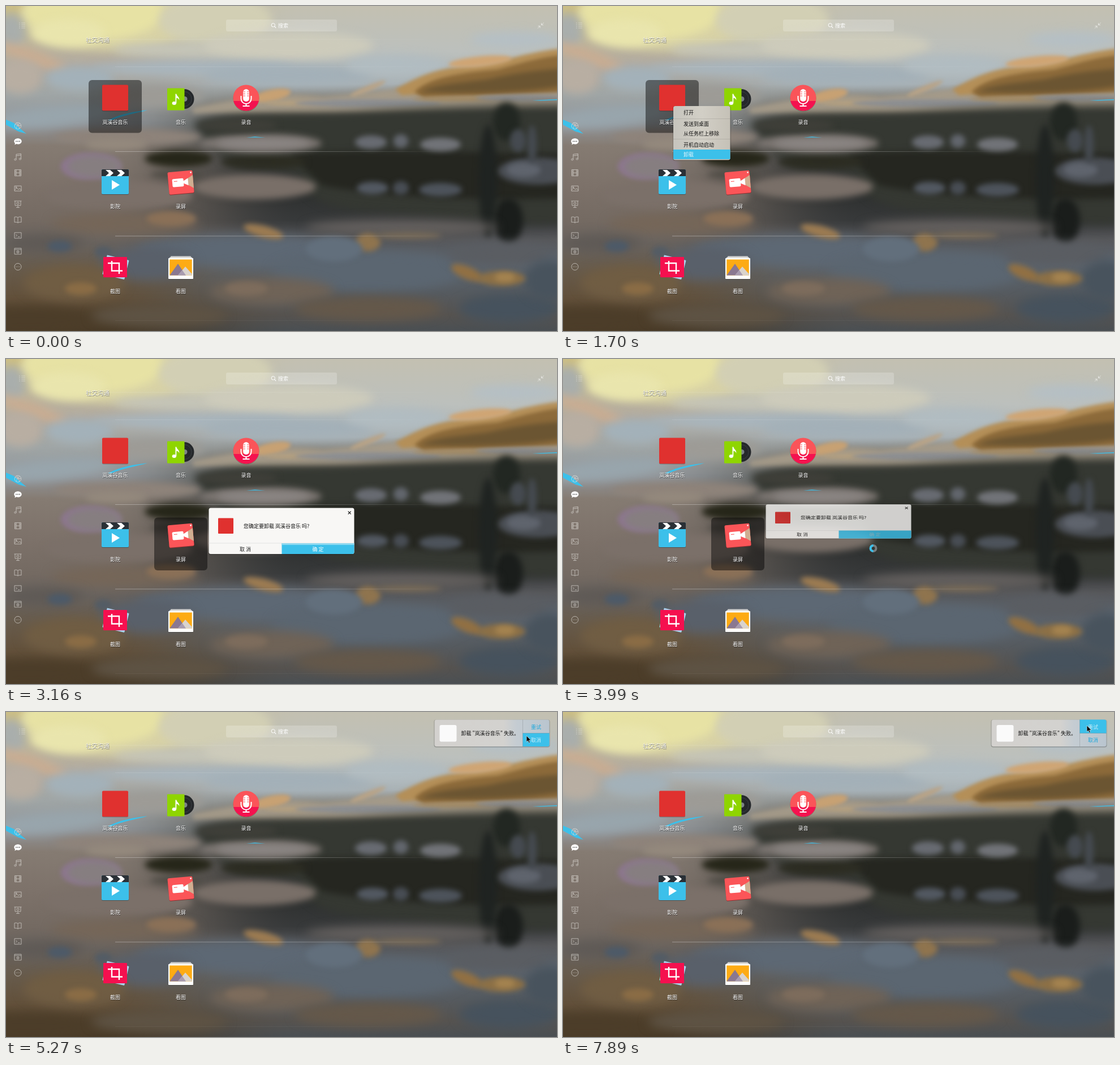
These frames come from a looping animation (974x575 px, 8000 ms). An HTML page with a canvas:

```html
<!DOCTYPE html>
<html lang="zh-CN">
<head>
<meta charset="utf-8">
<title>Launcher</title>
<style>
html, body { margin: 0; width: 100%; height: 100%; overflow: hidden; background: #555; }
#back, #ui { position: absolute; left: 0; top: 0; width: 974px; height: 575px; display: block; }
text { font: 9px "Noto Sans CJK SC", "Noto Sans CJK", "Noto Sans", sans-serif; white-space: pre; }
</style>
</head>
<body>
<canvas id="back" width="974" height="575"></canvas>
<svg id="ui" viewBox="0 0 974 575"></svg>
<script>
const W = 974, H = 575, LOOP = 8000;
const APP = '岚溪谷音乐', BLUE = '#3cc0ea', RED = '#e0312f';

/* ---------- wallpaper ---------- */
const ctx = document.getElementById('back').getContext('2d');

function column(stops) {
  const g = ctx.createLinearGradient(0, 0, 0, H);
  stops.forEach(([at, color]) => g.addColorStop(at, color));
  return g;
}

function blobs(blur, list) {
  ctx.filter = `blur(${blur}px)`;
  for (const [color, x, y, rx, ry, turn = 0] of list) {
    ctx.fillStyle = color;
    ctx.beginPath();
    ctx.ellipse(x, y, rx, ry, turn, 0, Math.PI * 2);
    ctx.fill();
  }
  ctx.filter = 'none';
}

function shape(blur, color, d) {
  ctx.filter = blur ? `blur(${blur}px)` : 'none';
  ctx.fillStyle = color;
  ctx.fill(new Path2D(d));
  ctx.filter = 'none';
}

function paintBack() {
  ctx.fillStyle = column([[0, '#cdbf84'], [.1, '#c0b89c'], [.18, '#b2aba0'], [.27, '#a0a6a6'],
    [.36, '#92969a'], [.43, '#857b72'], [.55, '#7d726a'], [.66, '#746a62'], [.73, '#69635e'],
    [.81, '#675b4c'], [.9, '#62503a'], [1, '#473926']]);
  ctx.fillRect(0, 0, W, H);
  ctx.fillStyle = column([[0, '#c3c0b1'], [.14, '#bcc0bd'], [.24, '#a9b2b6'], [.31, '#6c665c'],
    [.36, '#42443f'], [.43, '#3a3d3e'], [.55, '#2b2d2c'], [.66, '#37393a'], [.72, '#57585b'],
    [.79, '#5d6670'], [.88, '#565b60'], [.95, '#565350'], [1, '#4a4f53']]);
  for (let x = 150; x < W; x++) {
    const k = Math.min(1, (x - 150) / 380);
    ctx.globalAlpha = k * k * (3 - 2 * k);
    ctx.fillRect(x, 0, 1, H);
  }
  ctx.globalAlpha = 1;

  // sky
  blobs(8, [['#d9d3a6', 190, 20, 165, 58], ['#e7e2a4', 155, 10, 125, 50], ['#e9e5ad', 110, 48, 66, 24],
    ['#d2cfb4', 370, 25, 100, 46], ['#c5c5b8', 330, 78, 140, 13], ['#a9aeac', 8, 45, 26, 32],
    ['#c9ad92', 45, 90, 66, 13, .35], ['#b8aea2', 25, 125, 40, 30], ['#cdcbbb', 500, 70, 150, 26],
    ['#a8b5bd', 330, 110, 180, 13], ['#a3b1b9', 130, 128, 60, 22], ['#a3b0b8', 500, 122, 150, 18],
    ['#b1bcc1', 690, 105, 90, 18], ['#b5bfc4', 900, 60, 80, 14], ['#98a5ac', 75, 196, 110, 18, -.1],
    ['#9d9b96', 260, 158, 90, 20]]);

  // hills
  shape(4, '#a49a89', 'M330 180C420 162 480 150 560 160C620 156 680 146 740 140L990 130V190H330Z');
  shape(3, '#b48f58', 'M688 148C730 122 770 108 820 106C870 104 900 84 990 74V140L700 158Z');
  shape(3, '#8c6a3a', 'M722 152C750 124 810 118 870 112C920 98 950 90 990 86V152L740 164Z');
  shape(4, '#6b5532', 'M732 152C760 138 800 136 850 130C900 118 940 114 990 110V140C920 154 800 156 732 152Z');
  blobs(3, [['#cfa574', 838, 98, 56, 9, -.1], ['#c7a173', 470, 158, 34, 10, -.2], ['#b9a386', 640, 146, 34, 5, -.4],
    ['#b39f80', 520, 172, 60, 5], ['#8d8f92', 640, 172, 130, 7], ['#a58d68', 810, 164, 90, 5],
    ['#8b8b8b', 910, 163, 80, 6]]);

  // far shore and its reflection
  shape(8, '#353832', 'M330 206C400 184 520 196 640 186C760 178 860 176 990 174V384C900 394 760 372 620 362C560 356 520 330 520 300L470 286C400 300 370 262 330 206Z');
  shape(6, '#252620', 'M500 262C640 252 800 258 990 262V340C820 346 660 336 560 318Z');
  blobs(4, [['#8d7690', 150, 284, 53, 24]]);
  blobs(6, [['#867e80', 156, 284, 48, 20], ['#8e837a', 215, 232, 130, 14], ['#94897d', 195, 245, 55, 10],
    ['#262619', 305, 270, 60, 15], ['#2c2c22', 455, 276, 75, 13], ['#7b7571', 450, 243, 108, 17],
    ['#8b8684', 455, 243, 82, 8], ['#796f68', 440, 320, 108, 22], ['#3f3f39', 410, 211, 70, 11],
    ['#7b7069', 200, 335, 130, 26], ['#44423b', 300, 298, 46, 5], ['#222722', 885, 205, 24, 34],
    ['#1a1d1b', 888, 380, 26, 40], ['#1f2321', 852, 310, 16, 100]]);
  blobs(5, [['#4a4e54', 940, 292, 70, 24], ['#686b72', 645, 241, 28, 12], ['#62666d', 698, 239, 13, 12],
    ['#717378', 768, 245, 36, 12], ['#5f646d', 915, 290, 30, 13], ['#454a50', 905, 238, 14, 20],
    ['#525861', 648, 322, 28, 11], ['#484d54', 698, 322, 14, 12], ['#4d535b', 768, 325, 38, 12],
    ['#454a50', 930, 245, 8, 34]]);

  // near water
  blobs(9, [['#5d6874', 420, 432, 190, 28], ['#5b6671', 640, 470, 170, 36], ['#64605e', 700, 392, 170, 14],
    ['#59606a', 250, 455, 85, 30], ['#705d43', 120, 490, 90, 32], ['#4c3d29', 40, 556, 140, 24],
    ['#6f6357', 470, 505, 110, 24], ['#5e5344', 270, 548, 120, 18], ['#756658', 210, 385, 130, 18],
    ['#64584a', 640, 535, 130, 22], ['#46525d', 890, 535, 90, 26], ['#5a5d62', 870, 440, 90, 22],
    ['#48535d', 960, 485, 44, 36], ['#5f5a56', 70, 420, 70, 16]]);
  blobs(5, [['#9c7b51', 455, 399, 36, 10, .25], ['#8f744e', 640, 418, 22, 16], ['#776a58', 710, 406, 60, 6],
    ['#917043', 815, 472, 30, 11, .4], ['#8c7046', 876, 482, 42, 13], ['#a58450', 882, 480, 18, 8],
    ['#8a6c45', 132, 500, 28, 11], ['#8a7057', 292, 376, 44, 13], ['#7d6c5c', 425, 500, 38, 12],
    ['#626f7c', 580, 430, 50, 22], ['#4d5a68', 95, 425, 22, 10], ['#535c65', 172, 435, 16, 10]]);

  // bright glints
  shape(0, BLUE, 'M0 201L14 207L24 216L36 226L22 222L0 210Z');
  shape(0, BLUE, 'M180 202C205 190 225 187 250 184C232 190 205 193 185 203Z');
  shape(0, BLUE, 'M425 233L440 231L458 233L440 232.4ZM930 167L974 165V166.4L945 167.6Z');
}
paintBack();

/* ---------- svg helpers ---------- */
const text = (x, y, s, fill = '#fff', more = '') => `<text x="${x}" y="${y}" fill="${fill}" ${more}>${s}</text>`;
const mid = (x, y, s, fill, more = '') => text(x, y, s, fill, `text-anchor="middle" ${more}`);
const rect = (x, y, w, h, fill, r = 0, more = '') =>
  `<rect x="${x}" y="${y}" width="${w}" height="${h}" rx="${r}" fill="${fill}" ${more}/>`;
const path = (d, fill = 'none', more = '') => `<path d="${d}" fill="${fill}" ${more}/>`;
const circle = (x, y, r, fill = 'none', more = '') => `<circle cx="${x}" cy="${y}" r="${r}" fill="${fill}" ${more}/>`;
const group = (id, body, more = '') => `<g id="${id}" ${more}>${body}</g>`;
const line = (d, w = 2) => path(d, 'none', `stroke="#fff" stroke-width="${w}"`);
const label = (x, y, s) => mid(x + .5, y + 1, s, '#000', 'opacity=".6"') + mid(x, y, s);
const card = (id, x, y) => rect(x, y, 94, 93.5, '#000', 6, `id="${id}" fill-opacity=".46"`);

/* ---------- launcher ---------- */
const icons = {
  player: circle(315, 164.5, 17.5, '#25282b') + circle(315, 164.5, 13, 'none', 'stroke="#3b4044"') +
    circle(316, 164.5, 4.5, '#7d8486') + rect(285, 145.5, 30.5, 39, '#8fd500', 1) +
    `<ellipse cx="297.3" cy="172" rx="3.7" ry="3" fill="#fff"/>` +
    path('M299.5 172V155.5H301.3C302 160 307 160.5 306.3 167C305.5 164 303.5 163 301.3 162.5V172Z', '#fff'),
  recorder: circle(424.5, 163.4, 23, '#000', 'opacity=".25"') + circle(424.5, 162.5, 23, '#fa5459') +
    path('M402.2 168H446.8A23 23 0 0 1 402.2 168Z', '#f4124f') +
    rect(419.2, 147, 10.6, 22, '#fff', 5.3) + line('M415.5 159V164A9 9 0 0 0 433.5 164V159M424.5 173V177M418.5 177H430.5') +
    path('M419.5 152H423M426 152H429.5M419.5 155.5H423M426 155.5H429.5M419.5 159H423M426 159H429.5', 'none', 'stroke="#fa5459" stroke-width="1"'),
  cinema: rect(169, 290, 48, 44, '#000', 2, 'opacity=".3"') + rect(169, 289, 48, 44, BLUE, 2) +
    path('M169 301V291A2 2 0 0 1 171 289H215A2 2 0 0 1 217 291V301Z', '#2a3036') +
    [176, 196].map(x => path(`M${x} 290H${x + 8}L${x + 14} 295.5L${x + 8} 301H${x}L${x + 6} 295.5Z`, '#fff')).join('') +
    path('M187 308L201 316.5L187 325Z', '#fff'),
  capture: '<g transform="rotate(-5 309 312)">' + rect(287, 293.4, 44, 39.6, '#8c2f30', 2) + rect(287, 292.5, 44, 39.5, '#fb5558', 2) +
    path('M312 311L331 301V324Z', '#cfae91') + rect(294, 305, 20, 14.5, '#fff', 2) +
    path('M310 312L322 305.5V318.5Z', '#fff') + path('M297 309.5H303', 'none', 'stroke="#fb5558"') +
    circle(328, 296, 1.3, '#fff') + '</g>',
  shot: '<g transform="rotate(14 193 462)">' + rect(174, 444.5, 40, 35, '#a9d2ee', 1) + '</g>' +
    rect(172, 444, 42, 36, '#f5104f', 1) + line('M187 451V468.5H206M180 455H200V474', 2.4),
  viewer: rect(291, 442.5, 36, 4, '#ccc', 1) + rect(289, 444.5, 40, 4, '#e6e6e4', 1) +
    rect(287, 447, 44, 37, '#000', 1, 'opacity=".25"') + rect(287, 446, 44, 37, '#fbfbfa', 1) + rect(289.3, 448.5, 39.4, 28, '#fdab14') +
    path('M289.3 476.5L304 456L318 476.5Z', '#8a7891') + path('M304 476.5L317 461L328.7 474V476.5Z', '#d9d3cd') +
    path('M304 476.5L311.5 467.2L318 476.5Z', '#a89cb0')
};

const side = [
  circle(0, 0, 5.8) + path('M-5 -3C0 0 4 0 5.6 -1M-3 5C-1 -1 1 -4 4 -4.4M-2.5 -5.3C1 -2 2.5 2 2.6 5'),
  '',
  path('M-3 4V-5L5.5 -6V3M-3 -2.5L5.5 -3.5') + '<ellipse cx="-4.6" cy="4.2" rx="1.7" ry="1.4"/><ellipse cx="3.9" cy="3.2" rx="1.7" ry="1.4"/>',
  path('M-5.5 -5.5H5.5V5.5H-5.5ZM-3 -5.5V5.5M3 -5.5V5.5M-5.5 0H5.5M-5.5 -2.8H-3M-5.5 2.8H-3M3 -2.8H5.5M3 2.8H5.5'),
  path('M-6 -4.5H6V4.5H-6ZM-6 3L-2 -1L1 2L3 0L6 3') + circle(-3, -2, 1),
  path('M-6.5 -5.5H6.5M-5 -5.5V2.5H5V-5.5M0 2.5V6M-3 6H3') + circle(0, -1.5, 2),
  path('M0 -4C-2 -5.4 -4 -5.4 -6 -4.8V4.4C-4 4 -2 4 0 5.4C2 4 4 4 6 4.4V-4.8C4 -5.4 2 -5.4 0 -4V5.4'),
  path('M-6 -5H6V5H-6ZM-3.5 -2L-1.5 0L-3.5 2M0 2.5H3.5'),
  path('M-6 -5H6V5.5H-6ZM-6 -2.7H6') + circle(0, 1.4, 2.2) + circle(0, 1.4, .5),
  circle(0, 0, 6) + path('M-3.4 0H-2.2M-.6 0H.6M2.2 0H3.4')
].map((s, i) => `<g transform="translate(21 ${212 + i * 27.7})">${s}</g>`).join('');

const chat = path('M21 234.3C25 234.3 27.6 236.5 27.6 239.4C27.6 242.3 25 244.4 21 244.4C20 244.4 19.2 244.3 18.4 244L15.4 245.4L16 242.8C15 242 14.4 240.8 14.4 239.4C14.4 236.5 17 234.3 21 234.3Z', '#fff') +
  [18, 21, 24].map(x => circle(x, 239.4, .9, '#555')).join('');

const rules = [[59, 183, .12], [107.5, 193, .12], [257.5, 193, .3], [407, 193, .34], [556.5, 193, .05]]
  .map(([y, x, a]) => rect(x, y - .5, 780 - x, 1, 'url(#rule)', 0, `opacity="${a}"`)).join('');

const launcher = rules +
  path('M23 30H25M27 30H34M23 33H25M27 33H34M23 36H25M27 36H34M23 39H25M27 39H34', 'none', 'stroke="#fff" stroke-width="1" opacity=".3"') +
  rect(389, 24, 196, 21, '#fff', 3, 'fill-opacity=".2"') +
  circle(472.3, 33.8, 3.2, 'none', 'stroke="#fff"') + line('M474.7 36.2L477.2 38.8', 1.1) + text(481, 38.2, '搜索') +
  path('M946.5 30V33.5H950M950.5 29.5L946.5 33.5M944 39V35.5H940.5M940 39.5L944 35.5', 'none', 'stroke="#fff" stroke-width=".8" opacity=".7"') +
  text(141.5, 65, '社交沟通', '#555', 'style="font-size:10.5px" opacity=".75"') +
  text(141, 64, '社交沟通', '#fff', 'style="font-size:10.5px" opacity=".85"') +
  group('sidebar', side, 'stroke="#e4e2dd" stroke-width=".85" fill="none" opacity=".75"') + chat +
  card('hoverApp', 146, 131) + card('hoverCapture', 262, 280.5) +
  group('app', rect(170, 140.3, 46, 46, '#000', 2, 'opacity=".25"') + rect(170, 139.5, 46, 45.8, RED, 2) + label(193, 208.5, APP)) +
  Object.values(icons).join('') +
  label(309, 208.5, '音乐') + label(424.5, 208.5, '录音') + label(193, 358, '影院') +
  label(309, 358, '录屏') + label(193, 507.5, '截图') + label(309, 507.5, '看图');

/* ---------- menu, dialog, notice ---------- */
const items = [['打开', 188.5], ['发送到桌面', 209], ['从任务栏上移除', 226], ['开机自动启动', 246], ['卸载', 262.7]];
const menu = rect(194, 177, 103, 97, '#000', 4, 'opacity=".18"') + rect(195, 177, 100.5, 95.5, 'url(#menuFill)', 3.5) +
  rect(195, 199, 100.5, 1, '#000', 0, 'opacity=".1"') + rect(195, 235, 100.5, 1, '#000', 0, 'opacity=".1"') +
  rect(195, 0, 100.5, 17, BLUE, 0, 'id="pick"') +
  items.map(([s, y], i) => text(213, y + 3.3, s, '#111', `id="item${i}"`)).join('');

const dialog = rect(358, 264, 258, 82.5, '#000', 4, 'opacity=".2"') + rect(358.5, 263.5, 257, 81.5, '#f8f7f5', 3.5) +
  rect(375, 281.5, 27, 27.5, RED, 1) + text(420, 298.5, `您确定要卸载 ${APP} 吗?`, '#111') +
  path('M604.7 269.5L609.7 274.5M609.7 269.5L604.7 274.5', 'none', 'stroke="#222" stroke-width="1.1"') +
  rect(358.5, 325.5, 257, .8, '#ddd') +
  path('M358.5 326H487.5V345H362A3.5 3.5 0 0 1 358.5 341.5Z', BLUE, 'id="noFill"') +
  path('M487.5 326H615.5V341.5A3.5 3.5 0 0 1 612 345H487.5Z', BLUE, 'id="yesFill"') +
  rect(487.5, 326, 128, 3, '#8bd9f1', 0, 'id="yesBand"') +
  mid(423, 339.5, '取 消', '#222', 'id="noText"') + mid(551.5, 339.5, '确 定', '#222', 'id="yesText"');

const notice = rect(756.5, 13.5, 205, 49, '#000', 4, 'opacity=".22"') + rect(757.5, 13.5, 203, 47.5, 'url(#noticeFill)', 3.5) +
  rect(766.5, 23, 30, 29.5, '#fafafa', 3) + text(804.5, 41, `卸载 "${APP}" 失败。`, '#111') +
  path('M913.5 13.5H957A3.5 3.5 0 0 1 960.5 17V37.5H913.5Z', BLUE, 'id="retryFill"') +
  path('M913.5 37.5H960.5V57.5A3.5 3.5 0 0 1 957 61H913.5Z', BLUE, 'id="cancelFill"') +
  path('M913.5 13.5V61M913.5 37.5H960.5', 'none', 'stroke="#000" stroke-opacity=".13"') +
  mid(937, 30, '重试', '', 'id="retryText"') + mid(937, 53, '取消', '', 'id="cancelText"');

const spinner = circle(548.5, 335, 4.9, 'none', 'stroke="#777d80" stroke-width="4"') +
  path('M548.5 330.1A4.9 4.9 0 0 0 548.5 339.9', 'none', `id="arc" stroke="${BLUE}" stroke-width="4"`);

const fade = (id, stops) => `<linearGradient id="${id}">` +
  stops.map(([o, c, a = 1]) => `<stop offset="${o}" stop-color="${c}" stop-opacity="${a}"/>`).join('') + '</linearGradient>';

document.getElementById('ui').innerHTML = '<defs>' +
  fade('rule', [[0, '#fff'], [.6, '#fff', .8], [1, '#fff', 0]]) +
  fade('menuFill', [[0, '#c6c4bd'], [.5, '#d2cfc6'], [1, '#c5c1b7']]) +
  fade('noticeFill', [[0, '#d3d1ce'], [.6, '#d3d2cf'], [.72, '#c4ccd2'], [1, '#b9c5cf']]) + '</defs>' +
  launcher + group('menu', menu) + group('dialog', dialog) + group('spinner', spinner) + group('notice', notice) +
  path('M0 0V11L2.6 8.7L4.4 12.6L6.2 11.8L4.5 8H8Z', '#0a0a0a', 'id="cursor" stroke="#fff" stroke-opacity=".75" stroke-width=".7"');

/* ---------- motion ---------- */
const el = {};
document.querySelectorAll('#ui [id]').forEach(n => el[n.id] = n);
const show = (id, on) => el[id].setAttribute('visibility', on ? 'inherit' : 'hidden');
const set = (id, name, value) => el[id].setAttribute(name, value);
const ramp = (t, from, to) => Math.max(0, Math.min(1, (t - from) / (to - from)));

// pointer route: time, x, y
const route = [[5270, 920, 42], [5450, 938, 63], [5620, 961, 50], [5800, 948, 16], [5940, 892, 14], [6060, 856, 34],
  [6180, 822, 44], [6330, 808, 90], [6480, 842, 152], [6600, 876, 100], [6680, 881, 50], [6780, 905, 15],
  [6910, 952, 26], [7060, 962, 60], [7190, 925, 110], [7330, 868, 96], [7460, 853, 40], [7570, 890, 7],
  [7700, 918, 18], [7790, 918, 18], [7890, 926, 24], [8000, 926, 24]];

function pointer(t) {
  let i = 0;
  while (i < route.length - 2 && t >= route[i + 1][0]) i++;
  const at = k => route[Math.max(0, Math.min(route.length - 1, k))];
  const a = at(i - 1), b = at(i), c = at(i + 1), d = at(i + 2), u = ramp(t, b[0], c[0]);
  return [1, 2].map(k => b[k] + .5 * u * (c[k] - a[k] +
    u * (2 * a[k] - 5 * b[k] + 4 * c[k] - d[k] + u * (3 * (b[k] - c[k]) + d[k] - a[k]))));
}

function drawMenu(t) {
  const a = ramp(t, 880, 1060) * (1 - ramp(t, 2350, 2490));
  show('menu', t >= 920 && t < 2490);
  set('menu', 'opacity', a);
  const active = [1120, 1240, 1370, 1510, 1700].filter(s => t >= s).length - 1;
  show('pick', active >= 0);
  if (active >= 0) set('pick', 'y', items[active][1] - 8.7);
  items.forEach((_, i) => set('item' + i, 'fill', i === active ? '#e2f5fc' : '#111'));
}

function drawDialog(t) {
  const q = t < 3500 ? 1 - ramp(t, 2480, 2800) : ramp(t, 3850, 4150);
  show('dialog', q < 1);
  const s = Math.max(.001, Math.cos(q * Math.PI / 2));
  set('dialog', 'transform', `translate(0 ${304.5 - 36 * q - 304.5 * s}) scale(1 ${s})`);
  set('dialog', 'opacity', 1 - .85 * q * q);
  const yes = t >= 3160;
  show('noFill', !yes);
  show('yesFill', yes);
  show('yesBand', yes && t < 3410);
  set('noText', 'fill', yes ? '#222' : '#fff');
  set('yesText', 'fill', !yes ? '#222' : t < 3360 ? '#fff' : '#8fc3d3');
  show('spinner', t >= 3900 && t < 4180);
  set('arc', 'transform', `rotate(${(t - 3990) * .5} 548.5 335)`);
}

function drawNotice(t) {
  const [x, y] = pointer(t), on = t >= 5270;
  show('notice', t >= 4380);
  set('notice', 'opacity', t < 4430 ? .7 : 1);
  show('cursor', on);
  set('cursor', 'transform', `translate(${x} ${y})`);
  const over = on && x >= 913.5 && x < 960.5;
  const hot = { retry: over && y >= 13.5 && y < 37.5, cancel: over && y >= 37.5 && y < 61 };
  for (const id in hot) {
    show(id + 'Fill', hot[id]);
    set(id + 'Text', 'fill', hot[id] ? '#c9edf9' : '#1fa9dc');
  }
}

function draw(t) {
  show('hoverApp', t < 2440);
  show('hoverCapture', t >= 2870 && t < 4130);
  set('app', 'opacity', t >= 4080 && t < 4380 ? .45 : 1);
  drawMenu(t);
  drawDialog(t);
  drawNotice(t);
}

const start = performance.now();
function tick() {
  draw((performance.now() - start) % LOOP);
  requestAnimationFrame(tick);
}
tick();
</script>
</body>
</html>
```
